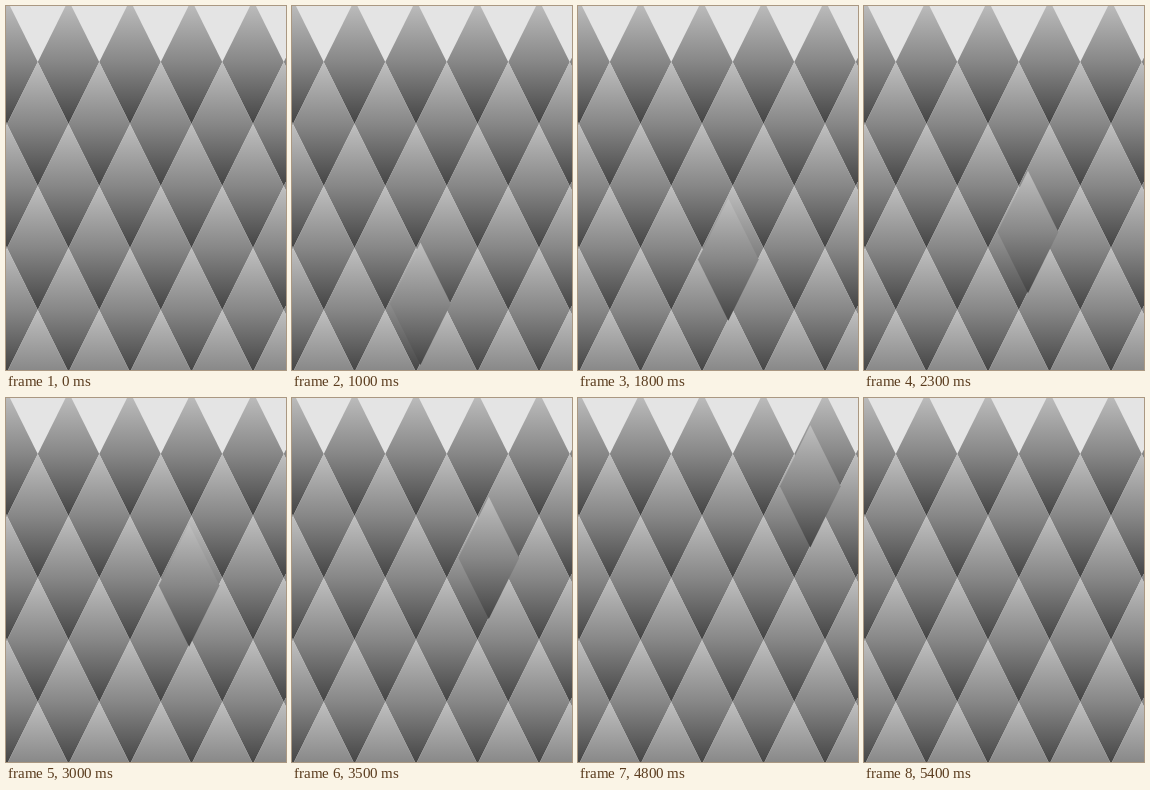
Animation, 280 px wide and 364 px high, one loop 5.5 s. Source, as an HTML page with a canvas:

```html
<!DOCTYPE html>
<html lang="en">
<head>
<meta charset="utf-8">
<title>Diamond wall</title>
<style>
html, body { margin: 0; width: 280px; height: 364px; overflow: hidden; background: #e4e4e4; }
canvas { display: block; }
</style>
</head>
<body>
<canvas width="280" height="364"></canvas>
<script>
const ctx = document.querySelector('canvas').getContext('2d');
const LOOP = 5500, STEP = 100, STEPS = 45;
const HALF_W = 30.75, HALF_H = 62;

function diamond(x, y, w, h) {
  const shade = ctx.createLinearGradient(0, y - h, 0, y + h);
  shade.addColorStop(0, '#c0c0c0');
  shade.addColorStop(0.5, '#878787');
  shade.addColorStop(1, '#444444');
  ctx.fillStyle = shade;
  ctx.beginPath();
  ctx.moveTo(x, y - h);
  ctx.lineTo(x + w, y);
  ctx.lineTo(x, y + h);
  ctx.lineTo(x - w, y);
  ctx.fill();
}

function wall() {
  ctx.fillStyle = '#e4e4e4';
  ctx.fillRect(0, 0, 280, 364);
  for (let row = 0; row < 6; row++) {
    const left = row % 2 ? -29.75 : 1;
    for (let col = 0; col < 6; col++) {
      diamond(left + col * 2 * HALF_W, 56 + row * HALF_H, HALF_W, HALF_H);
    }
  }
}

function draw(now) {
  const step = Math.floor(now % LOOP / STEP) - 9;
  wall();
  // One tile slides up across the wall, then merges with its twin.
  if (step > 0 && step < STEPS) {
    const p = step / STEPS;
    diamond(125.7 + 123 * p, 303.2 - 248 * p, 30.4, 61.2);
  }
}

const start = performance.now();
function frame() {
  draw(performance.now() - start);
  requestAnimationFrame(frame);
}
frame();
</script>
</body>
</html>
```
